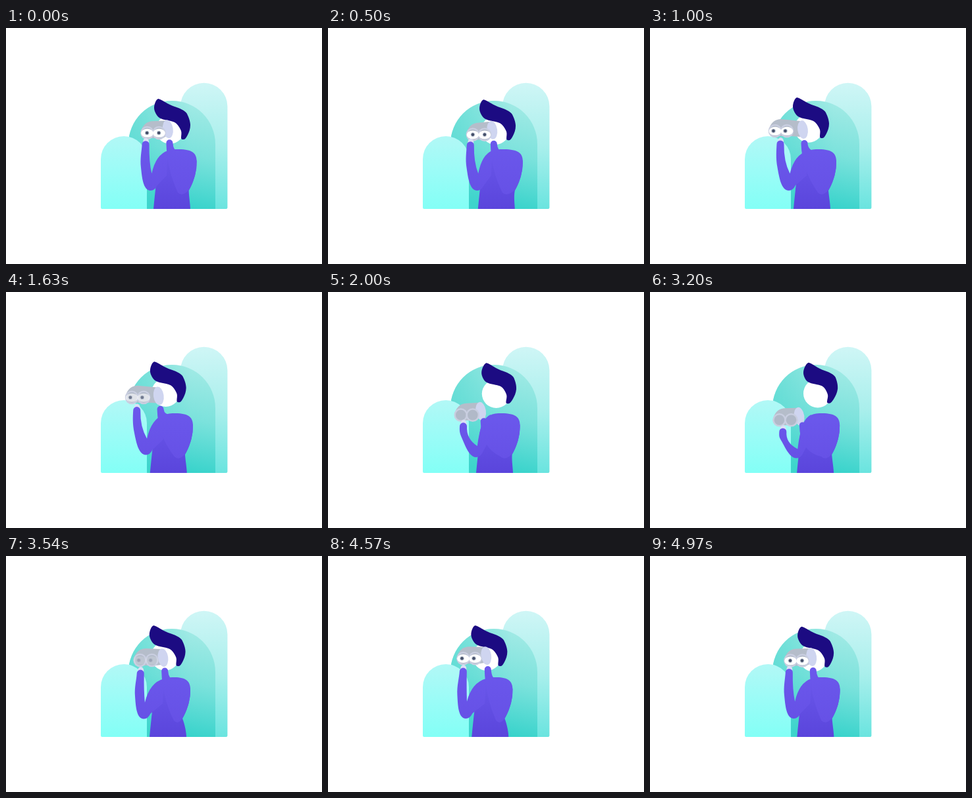
Write an HTML page that moves like this. It is 480 px wide and 360 px high and loops after 5010 ms.

```html
<!DOCTYPE html>
<html lang="en">
<head>
<meta charset="utf-8">
<title>Lookout</title>
<style>
  html, body { margin: 0; width: 100%; height: 100%; overflow: hidden; background: #fff; }
  svg { display: block; width: 100%; height: 100%; }
</style>
</head>
<body>
<svg viewBox="0 0 480 360">
  <defs>
    <linearGradient id="back" x1="0" y1="0" x2="0" y2="1">
      <stop offset="0" stop-color="#cff6f6"/>
      <stop offset=".5" stop-color="#a9efec"/>
      <stop offset="1" stop-color="#6ae4df"/>
    </linearGradient>
    <linearGradient id="mid" gradientUnits="userSpaceOnUse" x1="300" y1="110" x2="262" y2="276">
      <stop offset="0" stop-color="#a5ebe6"/>
      <stop offset=".5" stop-color="#7be2dc"/>
      <stop offset="1" stop-color="#34d2ca"/>
    </linearGradient>
    <linearGradient id="midSide" x1="0" y1="0" x2="1" y2="0">
      <stop offset="0" stop-color="#4ed8cf" stop-opacity=".55"/>
      <stop offset=".7" stop-color="#4ed8cf" stop-opacity="0"/>
    </linearGradient>
    <linearGradient id="front" x1="0" y1="0" x2="0" y2="1">
      <stop offset="0" stop-color="#b2f8f6"/>
      <stop offset=".5" stop-color="#9afcf7"/>
      <stop offset="1" stop-color="#83fff6"/>
    </linearGradient>
    <linearGradient id="shirt" x1="0" y1="0" x2="0" y2="1">
      <stop offset="0" stop-color="#6a58ea"/>
      <stop offset="1" stop-color="#5a45dc"/>
    </linearGradient>
    <linearGradient id="sleeve" x1="0" y1="0" x2="0" y2="1">
      <stop offset="0" stop-color="#6b58ec"/>
      <stop offset="1" stop-color="#6651e6"/>
    </linearGradient>
    <g id="lens">
      <circle r="10.3" fill="#c9cee0"/>
      <circle r="7.8" fill="#b1b9c8"/>
    </g>
    <g id="eye">
      <ellipse cy=".3" rx="9.3" ry="6.5" fill="#fff"/>
      <circle id="pupil" r="2.9" fill="#46506a" stroke="#cdd6e2" stroke-width="1"/>
    </g>
  </defs>

  <path fill="url(#back)" d="M265 276V119.5a35.7 35.7 0 0 1 71.4 0V274q0 2-2 2z"/>
  <path fill="url(#mid)" d="M186 276V177a66 66 0 0 1 132 0V276z"/>
  <path fill="url(#midSide)" d="M186 276V177a66 66 0 0 1 132 0V276z"/>
  <path fill="url(#front)" d="M146 276q-2 0-2-2V200a35 35 0 0 1 70 0V276z"/>

  <circle id="head" r="21.7" fill="#fff"/>
  <path id="hair" fill="#1c0b82" d="M-18-47C-15-47-9-43-4-40S8-35 13-33 24-28 26-24 31-13 31-7
    29 4 27 8 23 15 21 15 17 15 17 12 18 5 17 2 13-6 10-9 2-13-3-14-13-16-16-18-24-27-24-33-21-46-18-47Z"/>
  <path id="torso" fill="url(#shirt)"/>
  <path id="barrel" fill="#b5bdca"/>
  <ellipse id="cup" rx="7.8" ry="14" fill="#cfd5f0"/>
  <g id="lenses">
    <use href="#lens"/><use href="#lens" x="18"/>
    <g id="eyes"><use href="#eye"/><use href="#eye" x="18"/></g>
  </g>
  <ellipse id="palm" rx="4.5" ry="6" fill="#dcdff5"/>
  <path id="leftArm" fill="url(#sleeve)"/>
  <path id="rightArm" fill="url(#sleeve)"/>
</svg>

<script>
const LOOP = 5010;
const TURN = 430;        // the sway peaks here, after the loop point
const FAR = 10.2, LOW = 8;  // hip travel in px: at the peak, and while looking down

const $ = id => document.getElementById(id);
const set = (id, attrs) => { for (const k in attrs) $(id).setAttribute(k, attrs[k]); };

const clamp = v => Math.min(1, Math.max(0, v));
const sine = k => .5 - .5 * Math.cos(Math.PI * k);
const settle = k => sine(1 - (1 - k) ** 2);
const cubic = k => k < .5 ? 4 * k ** 3 : 1 - 4 * (1 - k) ** 3;
const linear = k => k;

function stateAt(time) {
  const t = time < TURN ? time + LOOP : time;
  const ramp = (from, to, ease = sine) => ease(clamp((t - from) / (to - from)));
  const shut = from => Math.sin(Math.PI * ramp(from, from + 185, linear));
  return {
    sway: FAR * (1 - ramp(TURN, 1000) + ramp(4470, TURN + LOOP))
      + LOW * (ramp(1500, 2150) - ramp(2950, 3560)),
    reach: ramp(TURN, 1000) - ramp(1500, 2150),
    drop: ramp(1500, 2800, settle) - ramp(3000, 3740, cubic),
    show: 1 - ramp(1520, 1800, linear) + ramp(3500, 3720, linear),
    open: 1 - .92 * (shut(1185) + shut(4025))
  };
}

function torsoPath(hip, side) {
  return `M${hip} 276C${hip + 2} 256 ${hip + 3} 245 ${hip + 4} 238
    C${hip + 4} 215 ${hip + 6} 186 ${hip + 34} 185C${side - 8} 184 ${side} 190 ${side} 203
    C${side} 222 ${side - 6} 238 ${side - 12} 248C${hip + 54} 258 ${hip + 56} 270 ${hip + 56} 276Z`;
}

function leftArmPath(hip, hx, hy, ex, ey, drop) {
  const cx = ex + 1.5, cy = ey - 26 + 13 * drop;               // crook
  const ox = (hx + ex) / 2 - 11 + 2 * drop, oy = (hy + ey) / 2;  // outer forearm
  const len = Math.hypot(hx - ex, hy - ey) / 14;
  const dx = (hx - ex) / len, dy = (hy - ey) / len;
  const sx = hip + 22;
  return `M${hx - 5.5} ${hy}A5.5 5.5 0 0 1 ${hx + 5.5} ${hy}
    Q${hx + 5 - drop} ${(hy + cy) / 2 + 4} ${cx} ${cy}Q${cx + (sx - cx) * .25} 193 ${sx} 187
    L${hip + 20} 225L${ex + 10} ${ey - 8}Q${ex + 6} ${ey} ${ex} ${ey}
    C${ex - 12 + 5 * drop} ${ey} ${ox - dx} ${oy - dy} ${ox} ${oy}
    C${ox + dx} ${oy + dy} ${hx - 6} ${hy + 10} ${hx - 5.5} ${hy}Z`;
}

function rightArmPath(hip, side, x, y) {
  return `M${x - 5} ${y}Q${x - 4} ${y + 40} ${hip + 37} 251Q${hip + 44} 258 ${side - 12} 247
    Q${side + 1} 225 ${side} 203Q${side - 4} 186 ${hip + 40} 187Q${x + 6} 190 ${x + 5} ${y}
    A5 5 0 0 0 ${x - 5} ${y}Z`;
}

function barrelPath(x, y, u, v) {
  return `M${x - 9} ${y - 4}Q${x - 4} ${y - 18} ${x + 9} ${y - 18}L${u - 3} ${v - 13}
    L${u - 3} ${v + 11}L${x + 24} ${y + 8}L${x} ${y + 8}Z`;
}

function draw(time) {
  const { sway, reach, drop, show, open } = stateAt(time);

  // Every joint follows from the hip, the reach and the drop
  const hip = 218 + sway;
  const side = hip + 62 + .6 * sway + 3 * reach;
  const headX = 241 + 1.33 * sway + 7.5 * drop, headY = 153 + .33 * sway;
  const lensX = 205 + 1.58 * sway - 15 * reach - 18 * drop;
  const lensY = 156 + .67 * sway + reach + 39 * drop;
  const cupX = lensX + 35 - .6 * sway + 7 * reach - 2 * drop;
  const cupY = lensY - 4 - .3 * sway + 2 * reach;
  const handX = lensX - .4 * sway + 8 * reach + 8 * drop;
  const handY = lensY + 20 - .4 * sway;
  const elbowX = hip - 9 + .8 * sway + 2 * reach + 5 * drop;
  const elbowY = 248 + 6 * drop;

  set('head', { cx: headX, cy: headY });
  set('hair', { transform: `translate(${headX - 1.5 * drop} ${headY}) skewX(${-7 * drop})` });
  set('torso', { d: torsoPath(hip, side) });
  set('barrel', { d: barrelPath(lensX, lensY, cupX, cupY) });
  set('cup', { cx: cupX, cy: cupY, transform: `rotate(-8 ${cupX} ${cupY})` });
  set('lenses', { transform: `translate(${lensX} ${lensY})` });
  set('eyes', { opacity: show, transform: `scale(1 ${open})` });
  set('pupil', { cx: Math.min(0, .28 * sway - 2 - .5 * reach) });
  set('palm', { cx: handX + .5, cy: handY - 4 });
  set('leftArm', { d: leftArmPath(hip, handX, handY, elbowX, elbowY, drop) });
  set('rightArm', { d: rightArmPath(hip, side, cupX + 2.5 + 3 * drop, cupY + 21 - 8 * drop) });
}

const begin = performance.now();
function tick() {
  draw((performance.now() - begin) % LOOP);
  requestAnimationFrame(tick);
}
tick();
</script>
</body>
</html>
```
